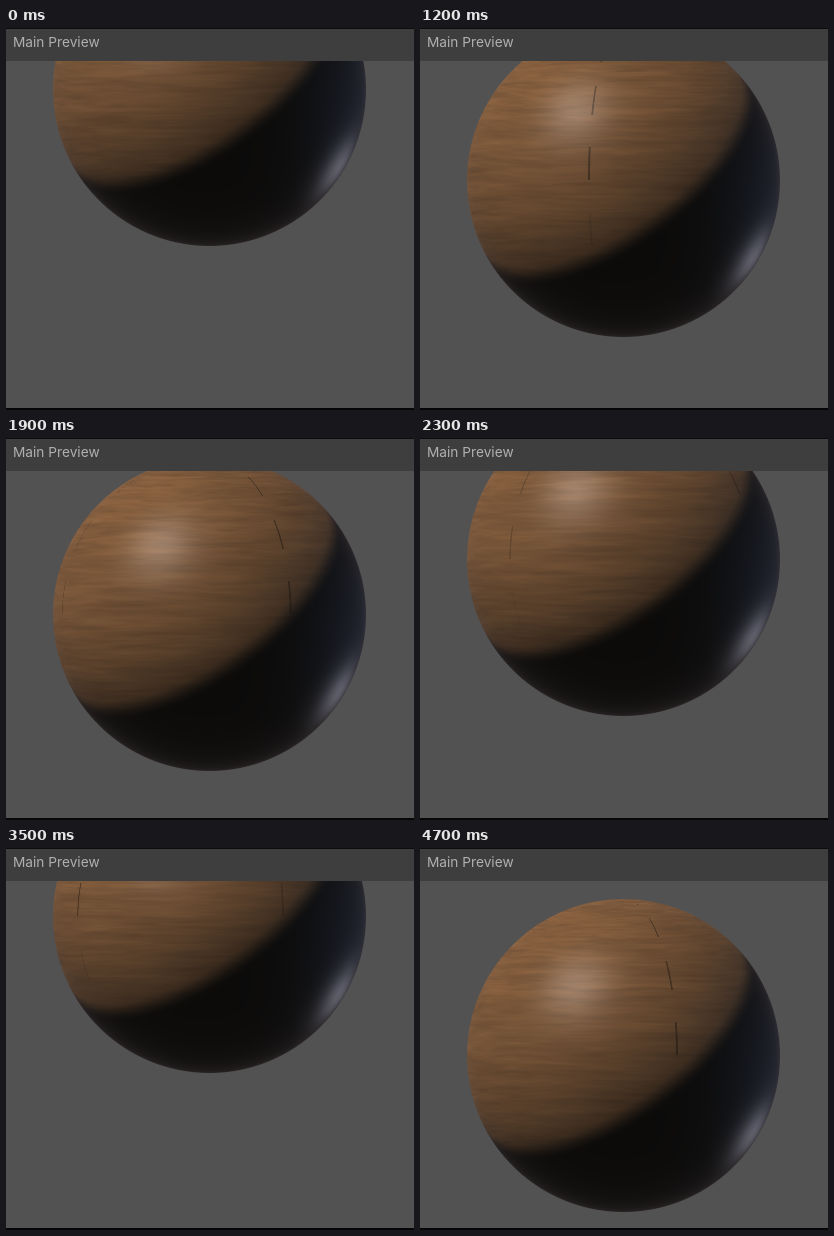
These frames come from a looping animation (408x382 px, 4.8 s). An HTML page with a canvas:

```html
<!DOCTYPE html>
<html lang="en">
<head>
<meta charset="utf-8">
<title>Main Preview</title>
<style>
  html, body { margin: 0; width: 100%; height: 100%; overflow: hidden; background: #525252; }
  header {
    position: absolute; inset: 0 0 auto; height: 33px; box-sizing: border-box;
    border-top: 1px solid #0c0c0c; background: #3e3e3e; color: #b0b0b0;
    font: 13.7px/26px Inter, sans-serif; padding-left: 7px; white-space: nowrap;
  }
  footer { position: absolute; inset: auto 0 0; height: 2px; background: #060606; }
  canvas { position: absolute; left: 46px; top: 0; }
</style>
</head>
<body>
<canvas id="ball" width="315" height="315"></canvas>
<header>Main Preview</header>
<footer></footer>
<script>
const LOOP = 4800, STEP = 100;
const SIZE = 315, MID = SIZE / 2, R = 156.5;
const ball = document.getElementById('ball');
const ctx = ball.getContext('2d');
const img = ctx.createImageData(SIZE, SIZE);

// Turn of the ball about its vertical axis: seconds, radians
const turns = [[0, 0], [.8, .912], [1.6, 1.827], [2.3, 2.55], [3.5, 3.85], [4.3, 5.006], [4.7, 5.199], [4.8, 5.26]];
// Plank joints: longitude, strength
const seams = [[-1.592, .4], [-3.361, .2], [-4.85, .4]];

const clamp = v => Math.max(0, Math.min(1, v));
const fract = v => v - Math.floor(v);
const mix = (a, b, k) => a + (b - a) * k;
const smooth = k => k * k * (3 - 2 * k);

function turnAt(t) {
  const i = Math.max(1, turns.findIndex(p => p[0] >= t));
  const [t0, a0] = turns[i - 1], [t1, a1] = turns[i];
  return mix(a0, a1, (t - t0) / (t1 - t0));
}

function hash(x, y) {
  let h = Math.imul(x, 374761393) + Math.imul(y, 668265263);
  h = Math.imul(h ^ (h >>> 13), 1274126177);
  return ((h ^ (h >>> 16)) >>> 0) / 4294967296;
}

function noise(x, y) {
  const i = Math.floor(x), j = Math.floor(y), k = smooth(x - i);
  return mix(mix(hash(i, j), hash(i + 1, j), k),
             mix(hash(i, j + 1), hash(i + 1, j + 1), k), smooth(y - j));
}

function wood(u, v) {
  const w = v + .025 * noise(u * 2, v * 5);
  const grain = .4 * noise(u * 1.5, w * 22) + .35 * noise(u * 3 + 40, w * 50) + .25 * noise(u * 8, w * 95);
  let tone = .84 + .32 * grain;
  if (fract(v / .43) > .5)
    for (const [at, depth] of seams) {
      const line = clamp(1.5 - Math.abs(u - at) * R);
      tone *= 1 - line * depth * (v < 0 ? 1 : .3);
    }
  return tone;
}

function shade(x, y, z, turn) {
  const sun = Math.max(0, -.53 * x - .74 * y + .43 * z);
  const light = Math.sqrt(sun) * smooth(clamp(sun / .17));
  const rim = (1 - z) ** 3 * (1 - .75 * light);
  const side = Math.max(0, .92 * x + .1 * y + .3 * z) ** 6;
  const back = Math.max(0, .82 * x + .5 * y + .28 * z) ** 45;
  const glow = Math.max(0, -.31 * x - .44 * y + .845 * z) ** 38;
  const lit = light && light * wood(Math.atan2(x, z) - turn, Math.asin(y));
  return [
    12 + 34 * rim + 10 * side + 62 * back + 34 * glow + 118 * lit,
    11 + 29 * rim + 16 * side + 62 * back + 38 * glow + 81 * lit,
    10 + 31 * rim + 27 * side + 68 * back + 43 * glow + 50 * lit
  ];
}

function draw(t) {
  const turn = turnAt(t);
  const top = Math.round(218 + 157 * (1 - Math.abs(Math.cos(t - .06))) - R - MID);
  for (let j = Math.max(0, 33 - top); j < SIZE; j++)
    for (let i = 0; i < SIZE; i++) {
      const dx = i + .5 - MID, dy = j + .5 - MID, d = Math.hypot(dx, dy);
      if (d > R + .5) continue;
      const s = Math.max(R, d), x = dx / s, y = dy / s;
      const z = Math.sqrt(Math.max(0, 1 - x * x - y * y));
      const alpha = 255 * clamp(R + .5 - d);
      img.data.set([...shade(x, y, z, turn), alpha], (j * SIZE + i) * 4);
    }
  ctx.putImageData(img, 0, 0);
  ball.style.top = top + 'px';
}

let shown = -1;
const start = performance.now();
function tick() {
  const step = Math.floor((performance.now() - start) % LOOP / STEP);
  if (step !== shown) draw((shown = step) * STEP / 1000);
  requestAnimationFrame(tick);
}
tick();
</script>
</body>
</html>
```
